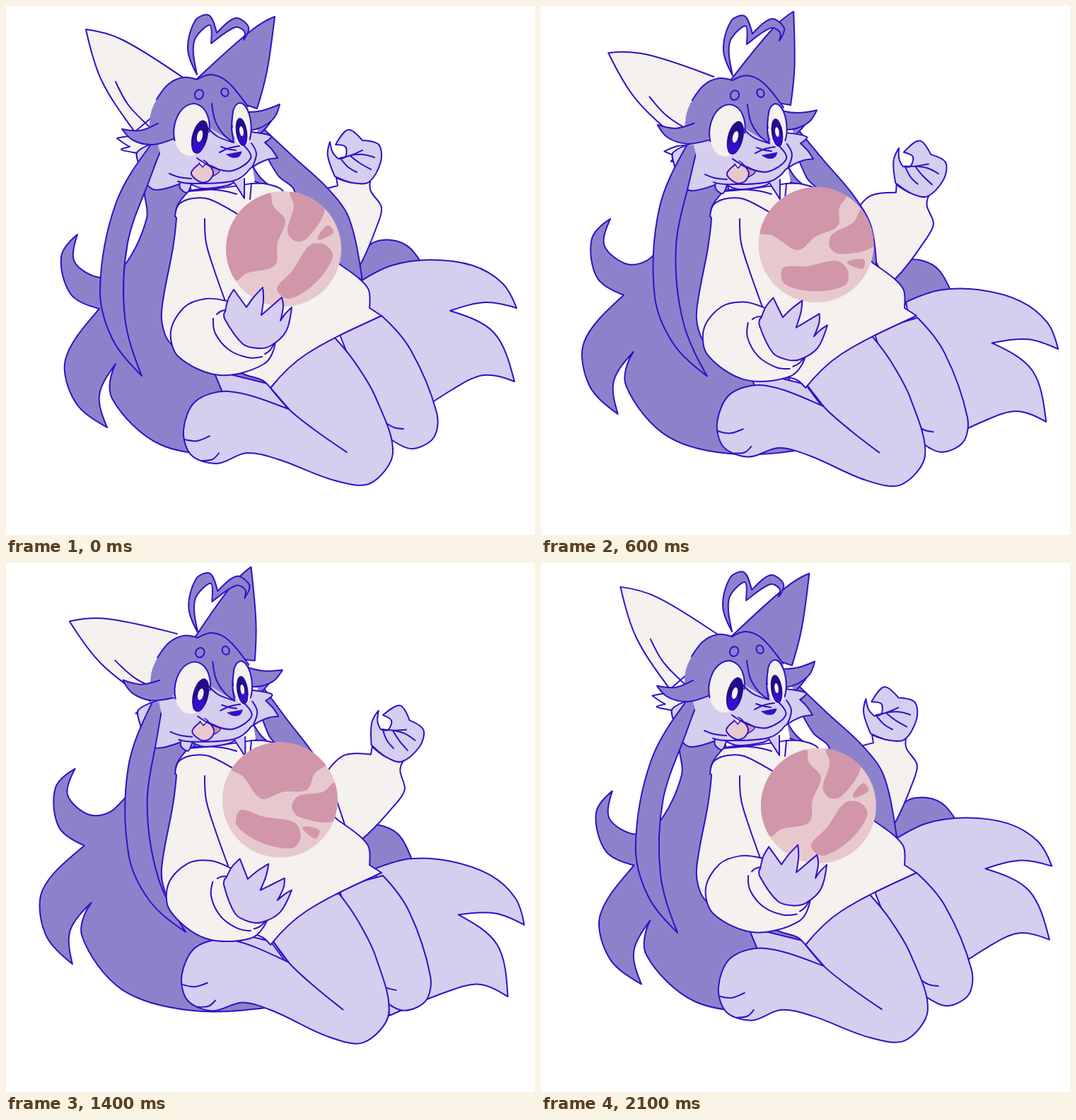
An HTML page with a canvas for the animation above (2.2 s loop, 748 px wide and 748 px high).

```html
<!DOCTYPE html>
<html lang="en">
<head>
<meta charset="utf-8">
<title>Planet spin</title>
<style>
html, body { margin: 0; width: 100%; height: 100%; overflow: hidden; background: #fff; }
canvas { display: block; }
</style>
</head>
<body>
<canvas id="stage" width="748" height="748"></canvas>
<script>
const ctx = document.getElementById("stage").getContext("2d");
const INK = "#3110c6", HAIR = "#8c82cc", FUR = "#d5ceef", CREAM = "#f4f1ee";
const ROSE = "#e7c9cd", LAND = "#d196a9", NIGHT = "#230c8c";
const LOOP = 2200, STEP = 100, RAD = Math.PI / 180;

// Puppet joints: full swing in degrees, pivot and shift
const joint = (deg, x, y, dx = 0, dy = 0) => ({ deg, x, y, dx, dy });
const STILL = joint(0, 0, 0);
const HEAD = joint(0, 0, 0, 1.5, 2);
const BACK = joint(11.2, 292, 287);
const TAIL = joint(13.2, 297, 524);
const FAR_LEG = joint(5.2, 480, 465);
const NEAR_LEG = joint(5.2, 473, 559);
const EAR_L = joint(-23.3, 243, 124);
const EAR_R = joint(-15.5, 323, 155);
const LOCK_L = joint(-12.6, 218, 191);
const LOCK_R = joint(12.2, 355, 170);
const TUFT_L = joint(11, 217, 178);
const TUFT_R = joint(20, 348, 158);
const ARM_R = joint(23.4, 445, 396);
const ARM_L = joint(16.8, 258, 444);
const PLANET = joint(77.5, 392.5, 343.5, -6, -10);

const gap = (a, b) => Math.hypot(b[0] - a[0], b[1] - a[1]);
const ghost = (b, c, d) => b.map((v, i) => d ? 2.5 * v - 2 * c[i] + d[i] / 2 : 2 * v - c[i]);
const slope = (a, b, c) => b.map((_, i) => (c[i] - a[i]) / (gap(a, b) + gap(b, c) || 1));

// "x,y x,y|x,y": smooth runs through points, a bar marks a corner
function curve(text) {
  const path = new Path2D();
  const runs = text.split("|").map(run => run.split(" ").map(p => p.split(",").map(Number)));
  let last;
  for (const run of runs) {
    const pts = last ? [last, ...run] : run, n = pts.length;
    const loop = runs.length === 1 && gap(pts[0], pts[n - 1]) === 0;
    if (!last) path.moveTo(...pts[0]);
    for (let i = 0; i < n - 1; i++) {
      const b = pts[i], c = pts[i + 1];
      const a = pts[i - 1] || (loop ? pts[n - 2] : ghost(b, c, pts[2]));
      const d = pts[i + 2] || (loop ? pts[1] : ghost(c, b, pts[n - 3]));
      const reach = gap(b, c) / 3, out = slope(a, b, c), into = slope(b, c, d);
      path.bezierCurveTo(b[0] + out[0] * reach, b[1] + out[1] * reach,
        c[0] - into[0] * reach, c[1] - into[1] * reach, c[0], c[1]);
    }
    last = pts[n - 1];
  }
  return path;
}

function oval(x, y, rx, ry, tilt = 0, from = 0, to = 360) {
  const path = new Path2D();
  path.ellipse(x, y, rx, ry, tilt * RAD, from * RAD, to * RAD);
  return path;
}

const parts = [];
function add(pose, fill, shape, width = 2, clip) {
  const path = typeof shape === "string" ? curve(shape) : shape;
  parts.push({ pose, fill, path, width, clip });
}

// back hair, tail
add(BACK, HAIR, "495,400|500,362|517,336 545,331 572,343 600,385|495,400");
add(BACK, HAIR, "245,200 197,250 199,300 165,370 133,384 97,362 101,323|78,355 92,408 132,428|84,500 98,560 143,596|132,550 155,506|150,555 218,620 320,633 436,608|300,400|245,200");
add(TAIL, FUR, "500,390 545,367 600,359 660,367 702,392 722,427|678,419 628,431|690,462 719,531|675,522 630,543 560,590|500,390");

// legs
add(FAR_LEG, FUR, "470,460|531,438|572,486 609,575 605,610 575,626 546,614|510,560|470,460");
add(FAR_LEG, null, "538,590 549,596 562,598");
add(STILL, FUR, "293,515 306,546|400,570|374,535|293,515");
add(NEAR_LEG, FUR, "464,468 492,502 522,552 547,632 515,675 465,671 385,641 340,632 298,647 262,635 251,600 268,559 315,545 400,570|374,540|420,480|464,468");
add(NEAR_LEG, null, "374,540 402,572 440,602 482,631");
add(NEAR_LEG, null, "253,613 270,615 288,608");
add(NEAR_LEG, null, "277,643 292,641 301,632");

// raised arm
add(ARM_R, CREAM, "419,298 434,268 469,254|467,243|490,250 515,248|516,262 531,285 523,315 503,362 488,385|419,298");
add(ARM_R, FUR, "465,241 455,212 458,192|462,207 470,216|480,213 480,199 466,196|484,175 504,190|527,196 530,220 513,249 490,250 465,241");
for (const fan of ["472,215 488,211 504,204", "488,211 505,210 521,214", "487,212 500,222 516,231", "474,217 484,228 496,235"])
  add(ARM_R, null, fan);

// far lock, ears, curl
add(LOCK_R, HAIR, "355,165 405,212 455,258 485,300 504,388|475,370|400,330|408,262 385,240 362,200");
add(EAR_L, CREAM, "250,101 165,48 113,33|135,105 182,178|215,150");
add(EAR_L, null, "155,107 173,140 202,170");
add(EAR_R, HAIR, "270,103 345,36 380,15|369,92 355,145|310,130");
add(HEAD, HAIR, "270,97|257,60 268,20 287,13 298,38|325,17 343,30 336,48|337,36 324,30 290,53|288,27 266,50 270,97");

// near lock
add(EAR_L, CREAM, "195,188 177,184 157,187|168,195 175,199|163,203 180,207 195,210");
add(HEAD, FUR, "222,190|186,206 188,225 196,248|212,260 250,250|250,190");
add(LOCK_L, HAIR, "205,196 155,280 133,400 150,470 192,523|168,440 172,335 205,240 222,196");
add(HEAD, HAIR, "348,225|360,243 378,258|352,248");

// hoodie
add(STILL, CREAM, "258,262 243,281 239,298|241,300 236,342 220,432 225,465 240,485|340,522 362,529 374,540|425,492 531,438|514,427|513,402 500,386 470,364|400,300|392,262 370,252 347,251|300,258 258,262");
add(STILL, null, "240,290 246,279 264,272 287,273 327,294");
add(STILL, null, "281,301 283,335 295,375 314,428");
add(STILL, null, "258,262 275,259 305,261 326,266");
add(STILL, null, "347,251 346,262 345,273");

// head
add(HEAD, FUR, "247,246 246,257 256,264 262,252|280,258 312,254 322,249|330,261 337,272|337,244");
add(HEAD, HAIR, "352,160 377,160|368,172 357,183");
const JAW = "243,248 265,251 322,247 345,230|358,222 370,217 384,215|376,203 366,193|375,184 346,178";
add(HEAD, FUR, JAW + "|330,140|270,140|215,196|222,225|243,248", 0);
add(HEAD, null, JAW);
const CROWN = "213,132 229,111 250,101 270,104|290,97 313,107 342,142";
add(HEAD, HAIR, CROWN + "|346,165|320,192|287,172|240,185|203,190|204,155 213,132", 0);
add(HEAD, null, CROWN);
add(TUFT_R, HAIR, "340,150 362,148 387,139|380,157 364,170 346,176");
add(TUFT_L, HAIR, "215,166 190,176 164,174|180,190 208,196 239,187");

// eyes
add(HEAD, CREAM, oval(262.5, 175, 25, 37, 8), 0);
add(HEAD, null, oval(262.5, 175, 25, 37, 8, 150, 360));
add(HEAD, CREAM, oval(333, 168, 13.5, 31, -5), 0);
add(HEAD, null, oval(333, 168, 13.5, 31, -5, 175, 405));
add(HEAD, HAIR, "291,138 296,163 308,182 322,193|319,172 321,150", 0);
add(HEAD, null, "291,138 296,163 308,182 322,193|319,172 321,150");
add(HEAD, null, "286,173 300,185 322,193");
for (const [x, y, rx, ry, tilt] of [[274, 185, 11, 24, 14], [333, 178, 8, 20, -8]]) {
  add(HEAD, NIGHT, oval(x, y, rx, ry, tilt), 0);
  add(HEAD, INK, oval(x - tilt / 5, y + ry / 2, rx * 0.75, ry / 2, tilt), 0);
  add(HEAD, CREAM, oval(x, y - 1, rx * 0.35, ry * 0.35, tilt), 0);
}
add(HEAD, null, oval(273, 125, 6, 7, 25));
add(HEAD, null, oval(309.5, 122, 5, 6, -25));

// muzzle
add(HEAD, LAND, "288,225 302,233 292,241", 1.5);
add(HEAD, ROSE, "262,237 271,225 282,221 293,235 287,247 275,249 262,237");
add(HEAD, CREAM, "273,222|278,228|284,221|279,218", 1.5);
add(HEAD, null, "270,215 292,228 320,233 346,215 335,196");
add(HEAD, null, "347,194 354,209 348,228");
add(HEAD, null, "231,237 245,242 262,244");
add(HEAD, INK, "312,210 333,206|329,213 320,214 312,210", 1);
add(HEAD, null, "302,207 315,201 330,198");
add(HEAD, null, "304,199 313,202 325,204");

// planet
const disc = oval(392.5, 343.5, 81.5, 81.5);
add(PLANET, ROSE, disc, 0);
for (const land of [
  "372,262 378,283 395,303 384,335 380,367 340,378 324,388 290,340 330,255 372,262",
  "402,262 407,283 398,318 408,332 425,329 451,288 440,250 402,262",
  "383,400 405,374 430,338 452,338 462,355 437,392 400,414 383,400",
  "441,326 455,310 463,320 443,331 441,326"
]) add(PLANET, LAND, land, 0, disc);

// near sleeve and hand
add(ARM_L, CREAM, "312,417 282,414 252,426 233,460 244,496 302,522 365,506 381,475|340,440");
add(ARM_L, null, "309,430 303,432 298,436");
add(ARM_L, null, "293,442 296,463 315,486 342,497 362,496");
add(ARM_L, null, "366,492 373,487 379,478");
add(ARM_L, FUR, "310,432 314,415 322,401|340,426|350,412 363,398|364,415 361,437|375,425 390,412|392,425 388,445|395,435 404,426|396,460 375,480 357,484 335,478 309,442 310,432");

ctx.lineJoin = ctx.lineCap = "round";
ctx.strokeStyle = INK;

function paint({ pose, fill, path, width, clip }, k) {
  ctx.save();
  ctx.translate(pose.x + pose.dx * k, pose.y + pose.dy * k);
  ctx.rotate(pose.deg * RAD * k);
  ctx.translate(-pose.x, -pose.y);
  if (clip) ctx.clip(clip);
  if (fill) { ctx.fillStyle = fill; ctx.fill(path); }
  if (width) { ctx.lineWidth = width; ctx.stroke(path); }
  ctx.restore();
}

const ease = u => u < 0.5 ? 2 * u * u : 1 - 2 * (1 - u) ** 2;
const start = performance.now();

function draw() {
  const t = Math.floor((performance.now() - start) % LOOP / STEP) * STEP;
  const k = ease(1 - Math.abs(1 - 2 * t / LOOP));
  ctx.clearRect(0, 0, 748, 748);
  parts.forEach(part => paint(part, k));
  requestAnimationFrame(draw);
}
draw();
</script>
</body>
</html>
```
